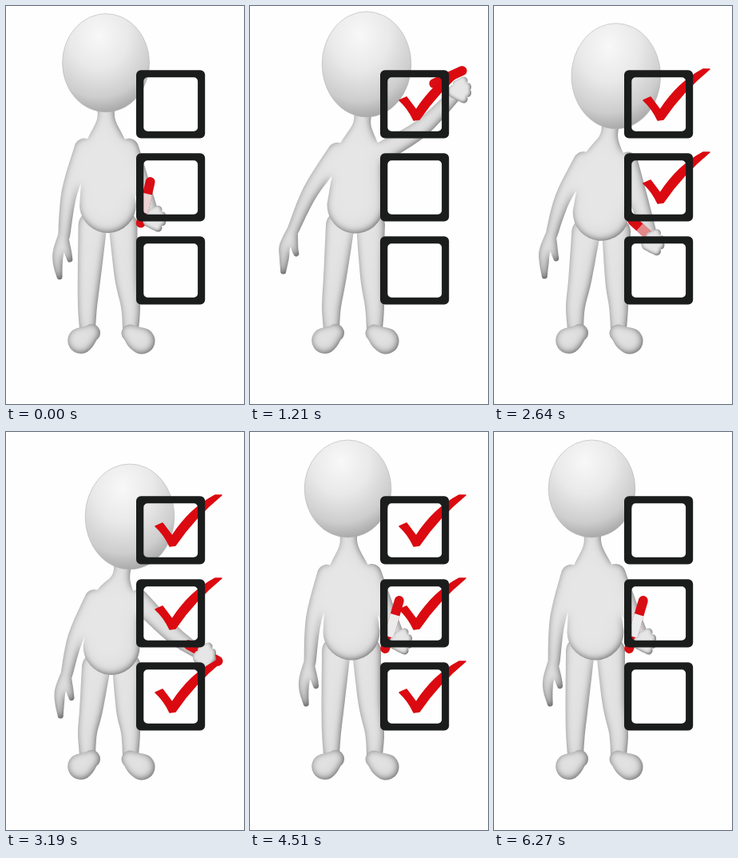
An HTML page that plays this animation: 298x498 px, repeating every 6.6 s.

```html
<!DOCTYPE html>
<html lang="en">
<head>
<meta charset="utf-8">
<title>Checklist</title>
<style>
html, body { margin: 0; width: 100%; height: 100%; overflow: hidden; background: #fdfefd; }
svg { display: block; width: 298px; height: 498px; }
</style>
</head>
<body>
<svg viewBox="0 0 298 498">
  <defs>
    <radialGradient id="ball" cx=".42" cy=".22" r=".84">
      <stop offset="0" stop-color="#f8f8f8"/>
      <stop offset=".4" stop-color="#e9e9e9"/>
      <stop offset=".75" stop-color="#cdcdcd"/>
      <stop offset="1" stop-color="#9c9c9c"/>
    </radialGradient>
    <filter id="clay" filterUnits="userSpaceOnUse" x="0" y="0" width="298" height="498" color-interpolation-filters="sRGB">
      <feGaussianBlur in="SourceAlpha" stdDeviation="4.2"/>
      <feOffset dx="-1.5" dy="-1" result="near"/>
      <feFlood flood-color="#d2d2d2"/>
      <feComposite operator="in" in2="near"/>
      <feComposite operator="atop" in2="SourceGraphic" result="base"/>
      <feGaussianBlur in="SourceAlpha" stdDeviation="11"/>
      <feOffset dx="-4" dy="-4" result="far"/>
      <feFlood flood-color="#fff" flood-opacity=".45"/>
      <feComposite operator="in" in2="far"/>
      <feComposite operator="atop" in2="base"/>
    </filter>
    <filter id="soft" filterUnits="userSpaceOnUse" x="0" y="0" width="298" height="498" color-interpolation-filters="sRGB">
      <feGaussianBlur in="SourceAlpha" stdDeviation="2"/>
      <feOffset dx="-1" dy="-1.5" result="near"/>
      <feFlood flood-color="#e6e6e6"/>
      <feComposite operator="in" in2="near"/>
      <feComposite operator="atop" in2="SourceGraphic"/>
    </filter>
    <path id="tick" d="M187 118 L196 114 L208 130 Q230 96 262 79 L270 79 Q236 107 212 142 L205 143 Q198 128 187 118Z"/>
  </defs>
  <g fill="#4c4c4c" filter="url(#clay)"><path id="legs"/></g>
  <g fill="#4c4c4c" filter="url(#clay)"><path id="feet"/></g>
  <g fill="#4c4c4c" filter="url(#clay)"><path id="body"/></g>
  <ellipse id="head" fill="url(#ball)" stroke="#b4b4b4" stroke-width=".6"/>
  <g fill="none" stroke-width="12">
    <path id="ink" stroke="#d90d14" stroke-linecap="round"/>
    <path id="barrel" stroke="#ececec"/>
  </g>
  <path id="hand" fill="#5c5c5c" filter="url(#soft)"/>
  <g id="ticks" fill="#db0910" stroke="#db0910" stroke-width="1.5" stroke-linejoin="round"></g>
  <g id="boxes" fill="#1b1c1c" fill-rule="evenodd"></g>
</svg>
<script>
const $ = id => document.getElementById(id);
const FRAME = 110, LOOP = 6600, LAST = 6270;
const FIRST = 770, PERIOD = 990, STROKE = 440, GAP = 104;
const rows = [0, 1, 2];
const markStart = i => FIRST + PERIOD * i;

// grip and cap are measured from the pen tip
const rest = { head: [122.5, 71, 61], chest: [124, 175], hip: [127, 250], wrist: [75, 288], grip: [20, -13], cap: [20, -68], white: [1] };
const high = { head: [146, 73, 66], chest: [137, 180], hip: [132, 250], wrist: [54, 280], grip: [-6, 25], cap: [-40, 18], white: [0] };
const middle = { head: [151, 73, 66], chest: [140, 180], hip: [136, 250], wrist: [69, 272], grip: [3, 3], cap: [-28, -37], white: [1] };
const low = { head: [155, 106, 66], chest: [138, 207], hip: [132, 270], wrist: [76, 303], grip: [-20, -8], cap: [-42, -23], white: [0] };

const markEnd = i => markStart(i) + STROKE;
const poses = [[-150, rest], [markEnd(0), high], [markEnd(1), middle], [markEnd(2), low], [markEnd(2) + 440, rest]];

const home = { at: [168, 275] };
const tips = [[0, home]];
for (const i of rows) {
  const y = GAP * i, t = markStart(i);
  tips.push([t, { at: [190, 118 + y] }], [t + STROKE * .45, { at: [208, 140 + y] }], [t + STROKE, { at: [268, 80 + y] }]);
}
tips.push([markEnd(2) + 440, home]);

const clamp = v => Math.max(0, Math.min(1, v));
const mix = (a, b, k) => a.map((v, i) => v + (b[i] - v) * k);

function blend(keys, t) {
  let i = 0;
  while (i < keys.length - 2 && keys[i + 1][0] <= t) i++;
  const [[t0, a], [t1, b]] = keys.slice(i, i + 2);
  const out = {};
  for (const part in a) out[part] = mix(a[part], b[part], clamp((t - t0) / (t1 - t0)));
  return out;
}

const spline = (a, b, c, d, u) =>
  b + .5 * u * (c - a + u * (2 * a - 5 * b + 4 * c - d + u * (3 * (b - c) + d - a)));

// Rounded tube through [x, y, radius] points
function tube(...pts) {
  const mid = [], n = pts.length - 1;
  for (let s = 0; s <= n * 6; s++) {
    const i = Math.min(n - 1, Math.floor(s / 6)), u = s / 6 - i;
    const q = [Math.max(0, i - 1), i, i + 1, Math.min(n, i + 2)].map(j => pts[j]);
    mid.push([0, 1, 2].map(c => spline(q[0][c], q[1][c], q[2][c], q[3][c], u)));
  }
  const one = [], two = [];
  mid.forEach(([x, y, r], i) => {
    const a = mid[Math.max(0, i - 1)], b = mid[Math.min(mid.length - 1, i + 1)];
    const dx = b[0] - a[0], dy = b[1] - a[1], l = Math.hypot(dx, dy) || 1;
    const nx = -dy / l * r, ny = dx / l * r;
    one.push((x + nx).toFixed(1) + ' ' + (y + ny).toFixed(1));
    two.unshift((x - nx).toFixed(1) + ' ' + (y - ny).toFixed(1));
  });
  const cap = r => `A${r} ${r} 0 0 0 `;
  return 'M' + one.join('L') + cap(pts[n][2]) + two.join('L') + cap(pts[0][2]) + one[0] + 'Z';
}

function set(id, attrs) {
  for (const k in attrs) $(id).setAttribute(k, attrs[k]);
}

function leg([x, y], side) {
  const hx = x + side * 19, hy = y + 24, ax = 129 + side * 27;
  return tube([hx, hy, 18], [(hx + ax) / 2 - 1, (hy + 402) / 2, 14.5], [ax, 376, 12], [ax, 404, 10]);
}

function leftArm(x, y, wx, wy) {
  const fx = wx + (wx - x) * .22, fy = wy + 52;
  const mx = (wx + fx) / 2, my = (wy + fy) / 2;
  return tube([x, y, 13], [(x + wx) / 2 - 6, (y + wy) / 2, 10], [wx, wy, 7.5]) +
    tube([wx, wy, 7.5], [mx - 4, my - 6, 7], [mx - 5, my + 9, 6], [fx, fy, 3.5]) +
    tube([wx, wy + 4, 6], [mx + 8, my - 4, 4.5], [mx + 10, my + 4, 3.5]);
}

function draw(t) {
  const { head: [hx, hy, ry], chest, hip, wrist, grip, cap, white } = blend(poses, t);
  const tip = blend(tips, t).at;
  const [cx, cy] = chest, [gx, gy] = tip.map((v, i) => v + grip[i]);
  const swing = 22 * Math.sin(Math.PI * clamp(t / markEnd(0)));
  const rx = cx + 28, sy = cy + 3;

  set('legs', { d: leg(hip, -1) + leg(hip, 1) });
  set('body', { d:
    tube([(hx + cx) / 2, hy + ry - 6, 11], [(hx + cx * 2) / 3, hy + ry + 11, 12],
      [...chest, 27], [...mix(chest, hip, .5), 32], [...hip, 35.5]) +
    leftArm(cx - 27, sy, wrist[0] - swing, wrist[1] - swing * .3) +
    tube([rx, sy, 13], [(rx + gx) / 2 + 2, (sy + gy) / 2 + 8, 11], [gx, gy, 8])
  });
  set('head', { cx: hx, cy: hy, rx: 36 + ry * .3, ry });

  const along = k => tip.map((v, i) => v + cap[i] * k).join(' ');
  set('ink', { d: `M${along(.06)}L${along(.94)}` });
  set('barrel', { d: `M${along(.28)}L${along(.68)}`, opacity: white[0] });

  let fist = tube([gx - 5, gy + 2, 9], [gx + 1, gy + 1, 10]);
  for (let k = -1.5; k < 2; k++)
    fist += tube([gx - 3, gy + k * 5, 5], [gx + 11 - k * k * 2.5, gy + k * 7.5, 5.2]);
  set('hand', { d: fist });

  $('ticks').setAttribute('opacity', clamp((5830 - t) / 330));
  for (const i of rows)
    $('cut' + i).setAttribute('width', t <= markStart(i) ? 0 : t >= markEnd(i) ? 100 : tip[0] - 176);
}

const NS = 'http://www.w3.org/2000/svg';
function add(parent, tag, attrs) {
  const el = parent.appendChild(document.createElementNS(NS, tag));
  for (const k in attrs) el.setAttribute(k, attrs[k]);
  return el;
}

function roundRect(x, y, w, h, r) {
  const a = `a${r} ${r} 0 0 1 `;
  return `M${x + r} ${y}h${w - 2 * r}${a}${r} ${r}v${h - 2 * r}${a}${-r} ${r}` +
    `h${2 * r - w}${a}${-r} ${-r}v${2 * r - h}${a}${r} ${-r}Z`;
}

for (const i of rows) {
  const transform = `translate(0 ${GAP * i})`;
  add($('boxes'), 'path', { transform, d: roundRect(163, 80.3, 86.2, 85.2, 6) + roundRect(172.3, 89.3, 67.8, 67.4, 5) });
  const clip = add(document.querySelector('defs'), 'clipPath', { id: 'clip' + i });
  add(clip, 'rect', { id: 'cut' + i, x: 180, y: 60, width: 0, height: 100 });
  const g = add($('ticks'), 'g', { transform });
  add(g, 'use', { href: '#tick', 'clip-path': `url(#clip${i})` });
}
set('feet', { d: tube([107, 409, 11], [99, 415, 15], [93, 419, 16.5]) +
  tube([155, 409, 11], [163, 415, 15], [170, 419, 16.5]) });

const start = performance.now();
let shown = -1;
function tick() {
  const t = (performance.now() - start) % LOOP;
  const now = Math.min(LAST, Math.floor(t / FRAME) * FRAME);
  if (now !== shown) draw(shown = now);
  requestAnimationFrame(tick);
}
tick();
</script>
</body>
</html>
```
